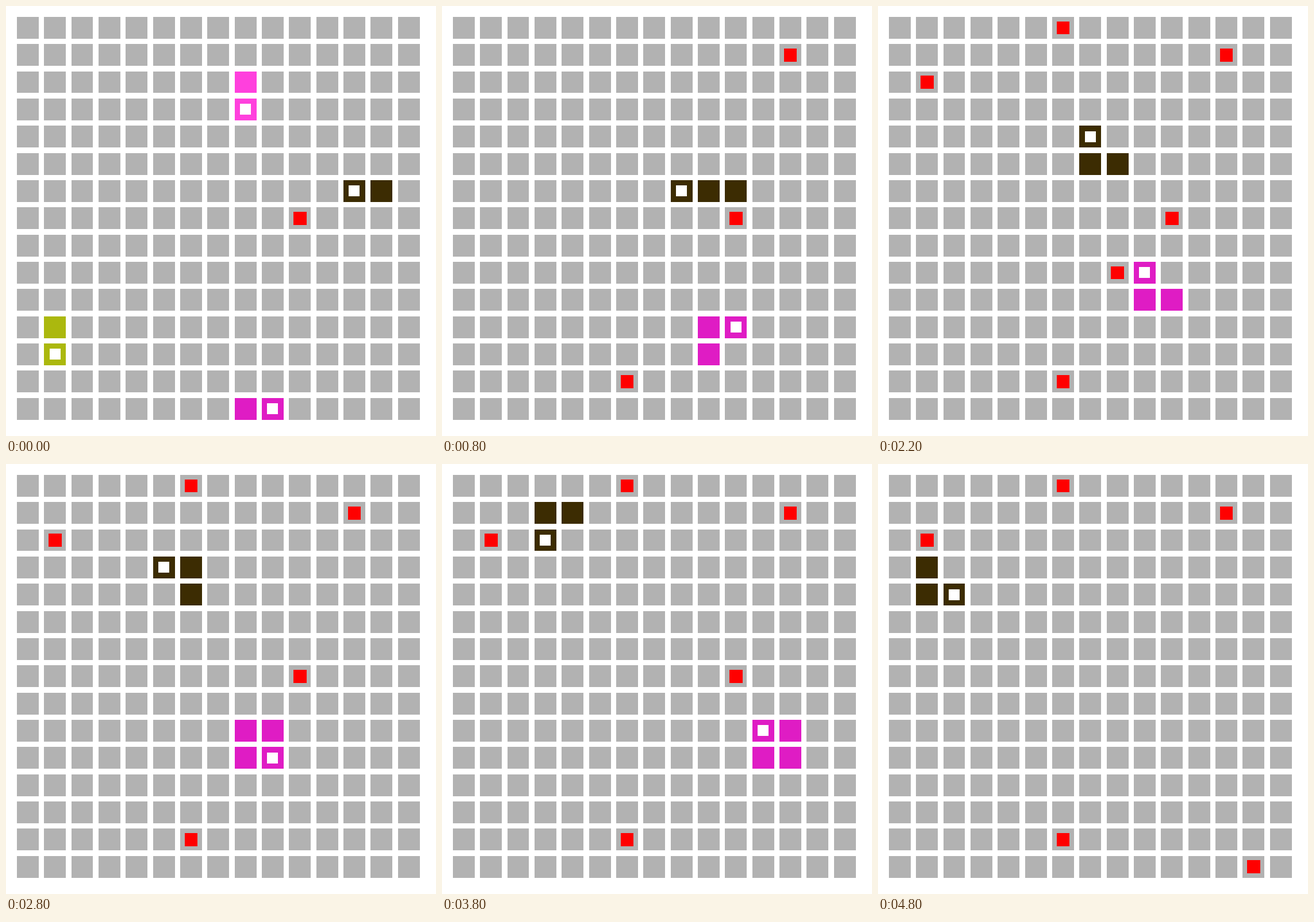
Write an HTML page with a canvas that moves like this. It is 748 px wide and 748 px high and loops after 5000 ms.

```html
<!DOCTYPE html>
<html lang="en">
<head>
<meta charset="utf-8">
<title>Snakes on a grid</title>
<style>
  html, body { margin: 0; width: 100%; height: 100%; overflow: hidden; background: #fff; }
  canvas { display: block; }
</style>
</head>
<body>
<canvas id="stage" width="748" height="748"></canvas>
<script>
const ctx = document.getElementById('stage').getContext('2d');
const SIZE = 15, STEP = 200, STEPS = 25;
const SCALE = 748 / 790; // board units: 40 per cell, 10 per gap, 20 margin
const DIRS = { U: [0, -1], D: [0, 1], L: [-1, 0], R: [1, 0] };

// Each route starts at the tail; a snake vanishes when its route runs out.
const snakes = [
  { color: '#ff40dd', start: [8, 2], route: 'DDDR', grow: [1] },
  { color: '#3c2c02', start: [13, 6], route: 'LLLLLDRULULULULULULDLDLDR', grow: [1] },
  { color: '#abb80e', start: [1, 11], route: 'DRRR', grow: [1] },
  { color: '#df1cc4', start: [8, 14], route: 'RUUURULDRULULDRRRRULULUU', grow: [1, 13, 23] },
];
for (const s of snakes) {
  s.path = [s.start];
  for (const d of s.route) {
    const [x, y] = s.path[s.path.length - 1];
    s.path.push([x + DIRS[d][0], y + DIRS[d][1]]);
  }
}

// x, y, step it appears, step it is eaten
const foods = [
  [10, 7, 0, 22], [12, 1, 1], [6, 13, 3], [6, 0, 6],
  [1, 2, 7], [8, 9, 10, 12], [13, 14, 21],
];

const snap = v => Math.round(v * SCALE - 0.01);

function box(x, y, inset, color) {
  const left = snap(20 + 50 * x + inset), right = snap(60 + 50 * x - inset);
  const top = snap(20 + 50 * y + inset), bottom = snap(60 + 50 * y - inset);
  ctx.fillStyle = color;
  ctx.fillRect(left, top, right - left, bottom - top);
}

function draw(step) {
  ctx.fillStyle = '#fff';
  ctx.fillRect(0, 0, 748, 748);
  for (let i = 0; i < SIZE * SIZE; i++) box(i % SIZE, Math.floor(i / SIZE), 0, '#b2b2b2');

  for (const [x, y, from, to = STEPS] of foods) {
    if (step >= from && step < to) box(x, y, 8, '#f00');
  }

  for (const { path, grow, color } of snakes) {
    const head = step + 1;
    if (head >= path.length) continue;
    const length = 2 + grow.filter(g => g <= step).length;
    for (const [x, y] of path.slice(head + 1 - length, head + 1)) box(x, y, 0, color);
    box(...path[head], 10, '#fff');
  }
}

function tick() {
  draw(Math.floor(performance.now() / STEP) % STEPS);
  requestAnimationFrame(tick);
}
tick();
</script>
</body>
</html>
```
